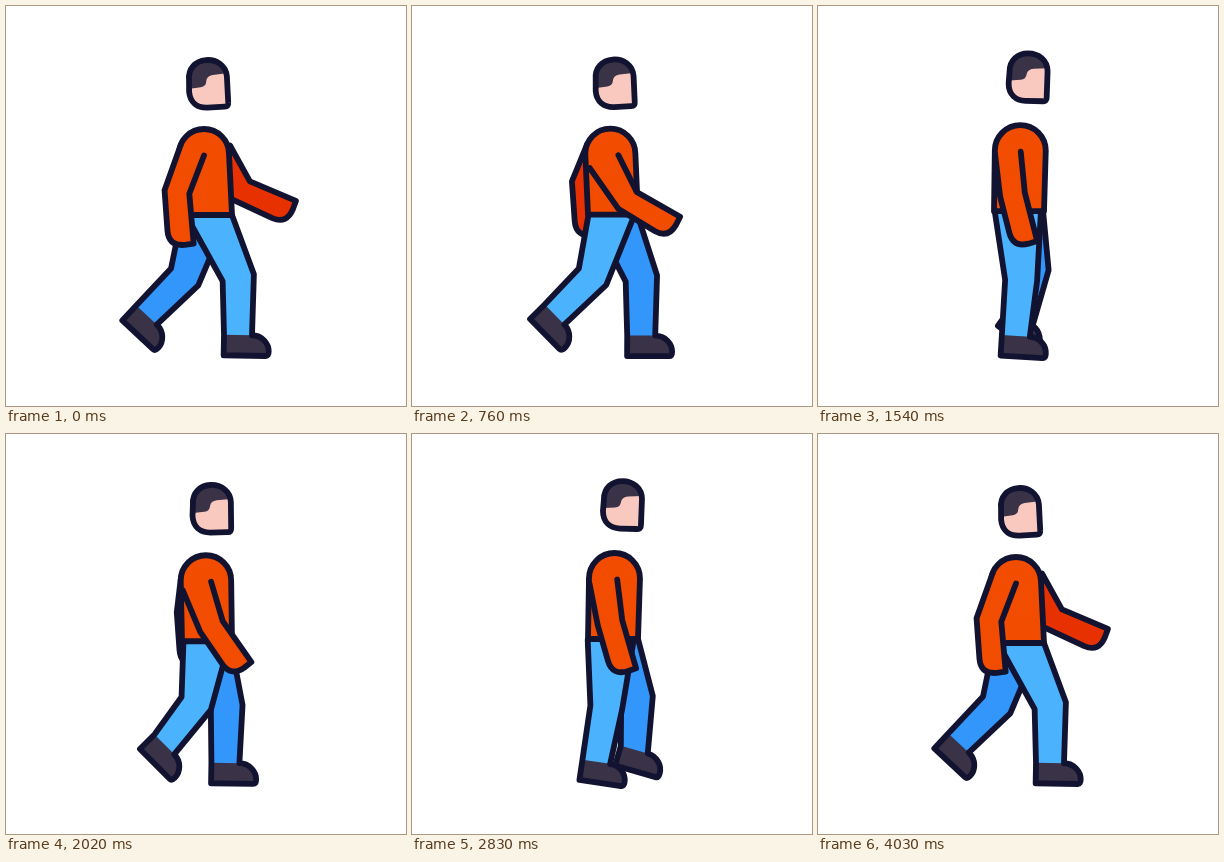
Animation of 400x400 px, one loop 4.06 s. Source, as an HTML page with a canvas:

```html
<!DOCTYPE html>
<html lang="en">
<head>
<meta charset="utf-8">
<title>Walking man</title>
<style>
  html, body { margin: 0; width: 100%; height: 100%; overflow: hidden; background: #fff; }
  canvas { display: block; width: 400px; height: 400px; }
</style>
</head>
<body>
<canvas id="stage" width="400" height="400"></canvas>
<script>
const ctx = document.getElementById('stage').getContext('2d');
const { PI, sin, cos, atan2, acos, hypot, abs, min, max } = Math;
const INK = '#121331', RED = '#f24c00', DARK_RED = '#e83100';
const BLUE = '#4bb3fd', DARK_BLUE = '#3296fb', SHOE = '#3a3347', SKIN = '#f9c9c0';

const LOOP = 4060, HOLD = 130, STEP = 30;
const BEGIN = 100, LENGTH = 3930, EASE_IN = 44, EASE_OUT = 676, STRIDES = 6;
const rad = deg => deg * PI / 180;

// Strides walked: steady pace with a short start and a long slow-down.
function stridesAt(time) {
  const t = min(max(time - BEGIN, 0), LENGTH);
  const over = max(t - (LENGTH - EASE_OUT), 0);
  const path = (t < EASE_IN ? t * t / (2 * EASE_IN) : t - EASE_IN / 2) - over * over / (2 * EASE_OUT);
  return STRIDES * path / (LENGTH - (EASE_IN + EASE_OUT) / 2);
}

// One step cycle of a foot: phase, ankle x, ankle y, pitch in degrees.
const footPath = [
  [0, 232, 329, 1], [.2, 218.5, 329, 1], [.36, 200, 330, 3], [.56, 183.5, 327.5, 9],
  [1, 140.5, 309, 43], [1.2, 160, 310.5, 45], [1.36, 199.5, 311, 38], [1.58, 224, 316.5, 14]
];

// Smooth closed curve through the keys, with a period of 2.
function follow(keys, phase) {
  const n = keys.length, u = phase % 2;
  const key = i => keys[(i + n) % n].map((v, j) => j ? v : v + 2 * Math.floor(i / n));
  let i = 0;
  while (i < n - 1 && keys[i + 1][0] <= u) i++;
  const [p, a, b, q] = [i - 1, i, i + 1, i + 2].map(key);
  const w = b[0] - a[0], s = (u - a[0]) / w;
  return a.slice(1).map((v, k) => {
    const j = k + 1, d = b[j] - v;
    const m0 = (b[j] - p[j]) / (b[0] - p[0]) * w, m1 = (q[j] - v) / (q[0] - a[0]) * w;
    return v + s * (m0 + s * (3 * d - 2 * m0 - m1 + s * (m0 + m1 - 2 * d)));
  });
}

function paint(path, fill, stroke = true) {
  ctx.fillStyle = fill;
  ctx.fill(path);
  if (stroke) ctx.stroke(path);
}

function drawLeg(phase, hipY, color) {
  const a = PI * phase;
  const hipX = 201 + 2 * cos(a) - 2 * sin(a);
  const [ax, ay, pitch] = follow(footPath, phase);

  // The knee lies ahead of the line from hip to ankle.
  const dx = ax - hipX, dy = ay - hipY, len = hypot(dx, dy);
  const bend = 10.5 + 3.2 * cos(2 * a) - 4 * sin(a);
  const kx = hipX + .55 * dx + bend * dy / len, ky = hipY + .55 * dy - bend * dx / len;
  const lean = (atan2(kx - hipX, ky - hipY) + atan2(ax - kx, ay - ky)) / 2;
  const wx = 16 * cos(lean), wy = -16 * sin(lean);

  const c = cos(rad(pitch)), s = sin(rad(pitch));
  const at = (x, y) => [ax + x * c - y * s, ay + x * s + y * c];
  const addShoe = p => {
    p.lineTo(...at(-14, 0));
    p.lineTo(...at(-14, 20.5));
    p.lineTo(...at(28, 20.5));
    p.quadraticCurveTo(...at(31, 20.5), ...at(31, 16));
    p.bezierCurveTo(...at(31, 8), ...at(24, 0), ...at(14, 0));
  };

  const leg = new Path2D();
  leg.moveTo(hipX - 23, hipY);
  leg.lineTo(kx - wx, ky - wy);
  addShoe(leg);
  leg.lineTo(kx + wx, ky + wy);
  leg.lineTo(hipX + 23, hipY);
  paint(leg, color, false);
  const shoe = new Path2D();
  addShoe(shoe);
  paint(shoe, SHOE, false);
  ctx.stroke(leg);
}

// The back edge of the sleeve leaves the round shoulder as a tangent.
function drawArm(phase, x, y, arch, color) {
  const a = PI * phase, swing = cos(a) ** 3;
  const upper = rad(4 - 25 * swing + 3 * sin(a));
  const fore = rad(12 - 31 * swing + 24 * swing * swing + 4 * sin(a));
  const mid = (upper + fore) / 2, width = 25;
  const ex = x + 41 * sin(upper), ey = y + 41 * cos(upper);
  const hand = (along, back) => [
    ex + along * sin(fore) - back * cos(fore),
    ey + along * cos(fore) + back * sin(fore)
  ];
  const ox = ex - width * cos(mid), oy = ey + width * sin(mid);
  const dx = ox - arch.x, dy = oy - arch.y;
  const turn = atan2(dy, dx) + acos(min(1, arch.r / hypot(dx, dy)));

  const arm = new Path2D();
  arm.moveTo(x, y);
  arm.lineTo(ex, ey);
  arm.lineTo(...hand(50, 0));
  arm.lineTo(...hand(50.5, 9));
  arm.bezierCurveTo(...hand(50.5, 19), ...hand(46, width), ...hand(35, width));
  arm.lineTo(ox, oy);
  arm.lineTo(arch.x + arch.r * cos(turn), arch.y + arch.r * sin(turn));
  paint(arm, color);
}

function drawTorso({ x, y, r }, waist) {
  const torso = new Path2D();
  torso.moveTo(176, waist);
  torso.lineTo(x - r, y);
  torso.arc(x, y, r, PI, 0);
  torso.lineTo(226, waist);
  torso.closePath();
  paint(torso, RED);
}

const face = new Path2D('M192,65 C192,54 200,47 210.5,47 C221,47 230,54 230,65 L229,91 ' +
  'Q229,95.5 225,95 L208,94.5 C198,94 191,88 191,77 Z');
const hair = new Path2D('M192,74 L203,73.5 Q208.5,73 209,68 Q210,63 216,62.5 L230,62 ' +
  'C228,53 220,47 210.5,47 C200,47 192,54 192,65 Z');

function drawHead(dip) {
  ctx.save();
  ctx.translate(210.5 - 8.5 * dip, 71 + 7 * dip);
  ctx.rotate(-.09 * dip);
  ctx.translate(-210.5, -71);
  paint(face, SKIN, false);
  paint(hair, SHOE, false);
  ctx.stroke(face);
  ctx.restore();
}

function draw(time) {
  const phase = stridesAt(time), a = PI * phase;
  const dip = abs(cos(a)) ** 3;
  const hipY = 206 + 3 * dip;
  const arch = { x: 202.5 - 4.5 * dip, y: 144.5 + 3.5 * dip, r: 25.5 - .5 * dip };

  ctx.fillStyle = '#fff';
  ctx.fillRect(0, 0, 400, 400);
  ctx.strokeStyle = INK;
  ctx.lineWidth = 5.8;
  ctx.lineJoin = ctx.lineCap = 'round';

  drawArm(phase + 1, 210 + 14 * cos(a) - 6 * sin(a), 137.5 + 2 * dip, arch, DARK_RED);
  drawLeg(phase + 1, hipY, DARK_BLUE);
  drawLeg(phase, hipY, BLUE);
  drawTorso(arch, 205 + 4 * dip);
  drawArm(phase, 202.5 - 4.5 * cos(a) + 2 * sin(a), 145.5 + 4 * dip, arch, RED);
  drawHead(dip);
}

const start = performance.now();
function tick() {
  const t = (performance.now() - start) % LOOP;
  draw(t < HOLD ? 0 : HOLD + Math.floor((t - HOLD) / STEP) * STEP);
  requestAnimationFrame(tick);
}
tick();
</script>
</body>
</html>
```
